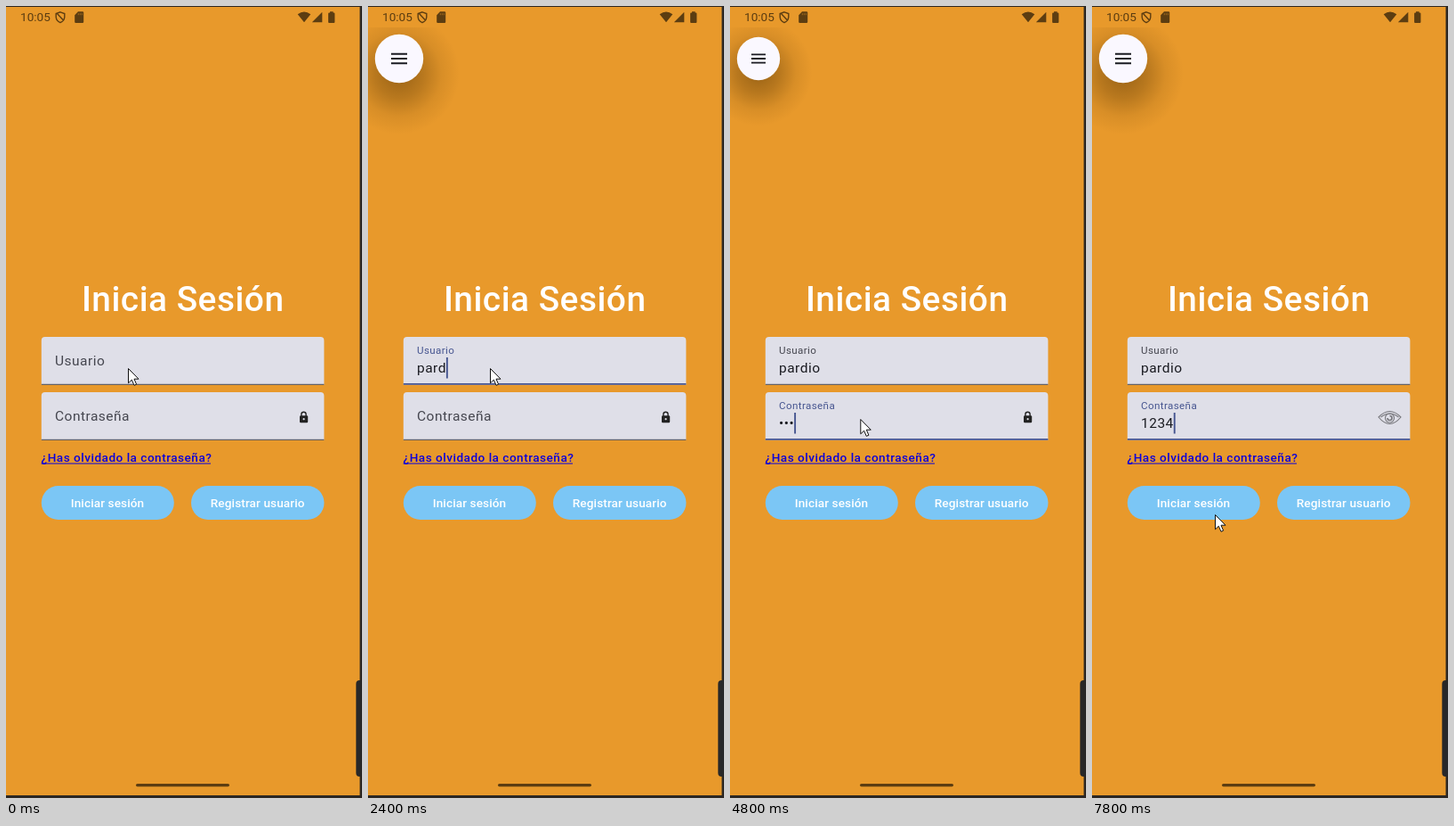
Recreate the animation shown at these times as an HTML page. Size 400 by 888 pixels, loop 8000 ms.

```html
<!DOCTYPE html>
<html lang="es">
<head>
<meta charset="utf-8">
<title>Inicia Sesión</title>
<style>
  html, body { margin: 0; width: 100%; height: 100%; overflow: hidden; background: #e8992b; }
  svg { display: block; width: 100%; height: 100%; font-family: Roboto, sans-serif; }
  text { white-space: pre; }
  .dim { fill: #5c3d11; }
  .ink { fill: none; stroke: #1a1b21; stroke-width: 2; }
  .medium { font-weight: 500; font-size: 13.6px; }
  .wide { letter-spacing: .48px; }
  .input { font-size: 15.5px; letter-spacing: .48px; fill: #1a1b21; }
</style>
</head>
<body>
<svg viewBox="0 0 400 888">
  <defs>
    <radialGradient id="glow" gradientUnits="userSpaceOnUse" cx="35" cy="76" r="68">
      <stop offset="0" stop-color="#4a2c00" stop-opacity=".5"/>
      <stop offset=".4" stop-color="#4a2c00" stop-opacity=".3"/>
      <stop offset=".7" stop-color="#4a2c00" stop-opacity=".1"/>
      <stop offset="1" stop-color="#4a2c00" stop-opacity="0"/>
    </radialGradient>
    <filter id="soft" x="-20%" y="-60%" width="140%" height="220%"><feGaussianBlur stdDeviation="4"/></filter>
    <clipPath id="belowStatus"><path d="M0 24H397V885H0Z"/></clipPath>
    <path id="menu" class="ink" d="M-9 -5.2H9M-9 0H9M-9 5.2H9"/>
  </defs>

  <rect width="400" height="888" fill="#e8992b"/>

  <!-- Status bar -->
  <text class="dim" x="16" y="17.3" font-size="13.6">10:05</text>
  <path d="M61 6.8L65.8 8.6V12.5Q65.5 16.5 61 18.6Q56.5 16.5 56.2 12.5V8.6ZM57.5 8.5L64.5 16" fill="none" stroke="#5c3d11" stroke-width="1.4"/>
  <path class="dim" d="M81 6.3H86Q87.2 6.3 87.2 7.5V17.7Q87.2 19 86 19H78.4Q77.2 19 77.2 17.7V10.2Z"/>
  <path d="M81.3 8.2V10.2M83.3 8.2V10.2M85.3 8.2V10.2" stroke="#e8992b" stroke-width=".8" opacity=".6"/>
  <path class="dim" d="M327.7 9.3Q335 3.5 342.3 9.3L335 18.3ZM355.3 6.8V18.2H343.8ZM364 7.4V6.2H367.6V7.4H368.4Q369.4 7.4 369.4 8.4V18Q369.4 19 368.4 19H363.1Q362.1 19 362.1 18V8.4Q362.1 7.4 363.1 7.4Z"/>

  <text id="title" class="wide" x="198.7" y="342.3" text-anchor="middle" font-size="38.8" font-weight="500" fill="#fff">Inicia Sesión</text>
  <g id="user"></g>
  <g id="pass"></g>

  <g id="lock">
    <path d="M331.9 460V457.8A2.6 2.6 0 0 1 337.1 457.8V460" fill="none" stroke="#222" stroke-width="1.4"/>
    <rect x="330" y="459.2" width="9.2" height="8" rx="1.2" fill="#222"/>
    <circle cx="334.6" cy="463.2" r="1.1" fill="#dfdfe8"/>
  </g>
  <g id="eye" fill="none" stroke="#77777c" stroke-width="1.1">
    <path d="M322 461Q334.5 448 347 461Q334.5 476 322 461Z"/>
    <path d="M324.5 461Q334.5 453 344.5 461"/>
    <circle cx="334.5" cy="462" r="5"/>
    <path d="M334.5 459.5A2.5 2.5 0 1 1 332 462" stroke-width="1.6"/>
  </g>

  <g id="actions">
    <text class="medium wide" x="39.6" y="511.3" fill="#0b00dc">¿Has olvidado la contraseña?</text>
    <path d="M39.6 513H230" stroke="#0b00dc" stroke-width="1.1"/>
    <g class="medium" letter-spacing=".1" text-anchor="middle">
      <rect x="39.8" y="538" width="149" height="38" rx="19" fill="#7bc6f5"/>
      <rect x="208" y="538" width="149.5" height="38" rx="19" fill="#7bc6f5"/>
      <text x="114" y="561.7" fill="#fff">Iniciar sesión</text>
      <text x="282.7" y="561.7" fill="#fff">Registrar usuario</text>
    </g>
  </g>

  <g clip-path="url(#belowStatus)">
    <g id="bubble">
      <circle cx="35" cy="76" r="68" fill="url(#glow)"/>
      <circle cx="35" cy="59" r="27.2" fill="#faf8ff"/>
      <use href="#menu" x="35" y="59"/>
    </g>
  </g>

  <g id="bar">
    <rect x="97" y="808" width="203" height="54" rx="27" fill="#4a2c00" opacity=".28" filter="url(#soft)"/>
    <rect x="97" y="806" width="203" height="54" rx="27" fill="#faf8ff"/>
    <circle cx="223.5" cy="833" r="21.5" fill="#d9e0fa"/>
    <use href="#menu" x="123.5" y="833"/>
    <g class="ink">
      <circle cx="173.7" cy="833" r="8.8"/>
      <path d="M168.8 835.3Q173.7 841.5 178.6 835.3Z" fill="#1a1b21" stroke="none"/>
      <path d="M170.5 829V832M176.9 829V832" stroke-width="2.6"/>
      <path d="M232 828.5V834H215.5M220 829L215 834L220 839" stroke="#142a5c"/>
      <path d="M268 824.8H285V842.2H268L262 833.5ZM271 829.8L278.5 837.2M278.5 829.8L271 837.2"/>
    </g>
  </g>

  <rect class="dim" x="146" y="872" width="105" height="3.2" rx="1.6"/>

  <!-- Emulator edges -->
  <path d="M0 0H400V888H0V885H397.5V1H0Z" fill="#2b2622"/>
  <rect x="393.3" y="756" width="12" height="108" rx="4" fill="#282828"/>

  <path id="pointer" d="M.5 .5V16.8L4.3 13.2L7 19.3L9.6 18.2L7 12.2H12Z" fill="#fff" stroke="#111" stroke-width="1"/>
</svg>
<script>
const LOOP = 8000, STEP = 200;
const BLUE = '#465590', GREY = '#45464f';
const FOCUS_USER = 380, FOCUS_PASS = 3880, REVEAL = 6400;
const USER_NAME = 'pardio', PASSWORD = '1234';
const USER_KEYS = [1800, 2000, 2200, 2400, 2600, 2800];
const PASS_KEYS = [4500, 4600, 4800, 5000];
// Pointer stops: time, x, y
const POINTER = [[0, 137, 406], [3000, 137, 406], [3600, 146.3, 463], [5200, 146.3, 463],
                 [5800, 340, 464], [6600, 340, 464], [7200, 138, 570], [LOOP, 138, 570]];

const $ = id => document.getElementById(id);
const set = (el, attrs) => { for (const k in attrs) el.setAttribute(k, attrs[k]); };
const progress = (t, start, duration) => Math.min(1, Math.max(0, (t - start) / duration));
const easeOut = p => 1 - (1 - p) ** 2;
const smooth = p => p * p * (3 - 2 * p);
const mix = (a, b, p) => a + (b - a) * p;
const moveY = (id, y) => set($(id), { transform: `translate(0 ${y})` });

function makeField(id, top, name) {
  $(id).innerHTML = `
    <path fill="#dfdfe8"/><path class="line"/>
    <text class="label" x="55">${name}</text>
    <text class="input" x="55" y="${top + 40}"></text>
    <rect class="caret" y="${top + 23}" width="1.9" height="23.5" fill="${BLUE}"/>`;
  const [box, line, label, input, caret] = $(id).children;

  return ({ float, active, text, blink, rise = 0, drop = 0 }) => {
    const bottom = top + 53.8 + drop, weight = active ? 1.9 : 1;
    set(box, { d: `M39.8 ${bottom}V${top + 4 - rise}q0 -4 4 -4H353.4q4 0 4 4V${bottom}Z` });
    set(line, { d: `M39.8 ${bottom - weight / 2}H357.4`, stroke: active ? BLUE : GREY, 'stroke-width': weight });
    set(label, {
      y: mix(top + 32.3, top + 19.2, float), fill: active ? BLUE : GREY,
      'font-size': mix(15.5, 11.6, float), 'letter-spacing': mix(.48, .39, float)
    });
    input.textContent = text;
    set(caret, { x: 55 + (text ? input.getComputedTextLength() : 0), visibility: blink ? 'visible' : 'hidden' });
  };
}

const drawUser = makeField('user', 371, 'Usuario');
const drawPass = makeField('pass', 433, 'Contraseña');

// The caret turns solid again after every key press or focus change.
function caretOn(t, resets) {
  const last = resets.filter(r => r <= t).pop();
  return last !== undefined && (t - last) % 1000 < 500;
}

function pointerAt(t) {
  const i = POINTER.findIndex(stop => stop[0] > t);
  const [t0, x0, y0] = POINTER[i - 1], [t1, x1, y1] = POINTER[i];
  const p = smooth(progress(t, t0, t1 - t0));
  return [mix(x0, x1, p), mix(y0, y1, p)];
}

function draw(t) {
  const floatUser = easeOut(progress(t, FOCUS_USER, 180));
  const floatPass = easeOut(progress(t, FOCUS_PASS, 180));
  const swell = 2.2 * Math.sin(Math.PI * floatPass);
  const onUser = t >= FOCUS_USER && t < FOCUS_PASS, onPass = t >= FOCUS_PASS;
  const typed = keys => keys.filter(k => k <= t).length;
  const secret = PASSWORD.slice(0, typed(PASS_KEYS));
  const revealed = t >= REVEAL;

  drawUser({
    float: floatUser, active: onUser, text: USER_NAME.slice(0, typed(USER_KEYS)),
    blink: onUser && caretOn(t, [FOCUS_USER, ...USER_KEYS])
  });
  drawPass({
    float: floatPass, active: onPass, text: revealed ? secret : '•'.repeat(secret.length),
    blink: onPass && caretOn(t, [FOCUS_PASS, ...PASS_KEYS, 5050, REVEAL]), rise: swell, drop: swell
  });
  moveY('title', -swell);
  moveY('user', -swell);
  moveY('actions', swell);
  set($('lock'), { visibility: revealed ? 'hidden' : 'visible' });
  set($('eye'), { visibility: revealed ? 'visible' : 'hidden' });

  // The keyboard bar collapses into a corner bubble while typing.
  const bar = t < 3000
    ? progress(t, 700, 200) - progress(t, 1700, 200)
    : progress(t, 4050, 150) - progress(t, 4400, 150);
  const bubble = t < 4050 ? easeOut(progress(t, 1900, 300))
    : t < 4600 ? 1 - progress(t, 4050, 100) : easeOut(progress(t, 4600, 300));
  set($('bar'), { opacity: bar, transform: `translate(0 ${(1 - bar) * 20})` });
  set($('bubble'), {
    transform: `translate(8 59) scale(${bubble}) translate(-8 -59)`,
    visibility: bubble > 0 ? 'visible' : 'hidden'
  });
  set($('pointer'), { transform: `translate(${pointerAt(t)})` });
}

function tick() {
  const t = performance.now() % LOOP;
  draw(Math.floor(t / STEP) * STEP);
  requestAnimationFrame(tick);
}
tick();
</script>
</body>
</html>
```
